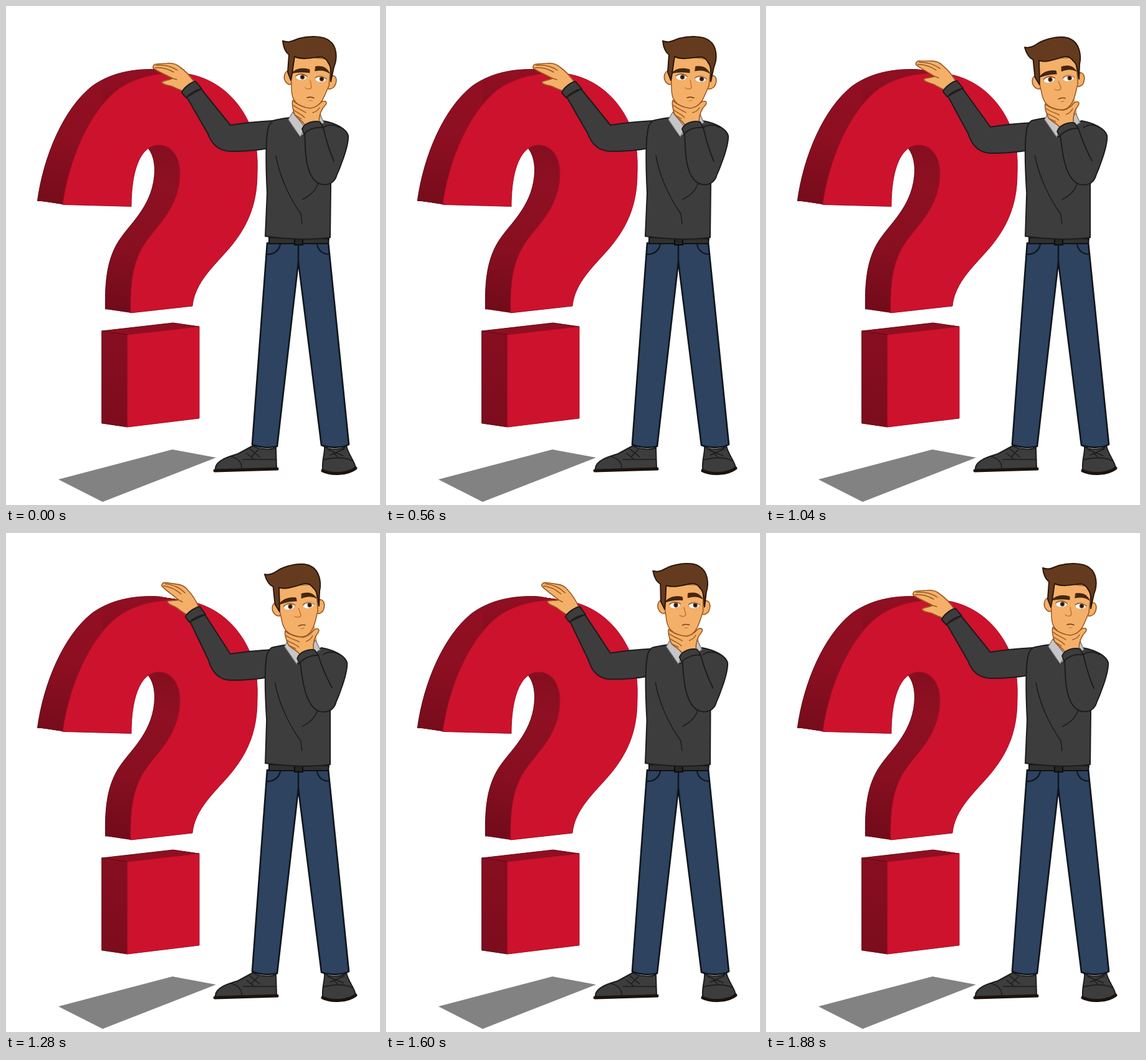
An HTML page with a canvas that plays this animation: 600x800 px, repeating every 1.92 s.

```html
<!DOCTYPE html>
<html lang="en">
<head>
<meta charset="utf-8">
<title>Thinking man</title>
<style>
html, body { margin: 0; width: 100%; height: 100%; overflow: hidden; background: #fff; }
canvas { display: block; width: 600px; height: 800px; }
</style>
</head>
<body>
<canvas id="stage" width="600" height="800"></canvas>
<script>
const ctx = document.getElementById('stage').getContext('2d');
const LOOP = 1920, STEP = 40;
const RED = '#cd122d', KNIT = '#3d3d3d', INK = '#1c1c1c', SKIN = '#f4b069', SKIN_LINE = '#97571f';
const HAIR = '#653b1f', HAIR_LINE = '#2b170a', DENIM = '#2d435f';
const HOOK = 'M91,318C101,246 133,171 178,135C211,111 251,106 286,108C338,115 375,150 393,195C402,218 404,240 403,268C403,317 388,352 361,385C335,416 303,442 299,481L200,492C199,445 203,407 226,376C243,352 278,322 279,270C279,240 265,223 245,223C215,223 201,265 201,321Z';

function shape(d, fill, line, width = 2) {
  const p = new Path2D(d);
  if (fill) { ctx.fillStyle = fill; ctx.fill(p); }
  if (line) { ctx.strokeStyle = line; ctx.lineWidth = width; ctx.stroke(p); }
}
const stroke = (d, line, width) => shape(d, null, line, width);

function dot(x, y, rx, ry, fill) {
  ctx.beginPath();
  ctx.ellipse(x, y, rx, ry, 0, 0, Math.PI * 2);
  ctx.fillStyle = fill;
  ctx.fill();
}

function turned(x, y, degrees, draw) {
  ctx.save();
  ctx.translate(x, y);
  ctx.rotate(degrees * Math.PI / 180);
  ctx.translate(-x, -y);
  draw();
  ctx.restore();
}

function fade(y0, y1, ...colors) {
  const g = ctx.createLinearGradient(0, y0, 0, y1);
  colors.forEach((c, i) => g.addColorStop(i / (colors.length - 1), c));
  return g;
}

// Smooth interpolation through [time, value] keys
function track(keys, t) {
  for (let i = 1; i < keys.length; i++) {
    const [t0, a] = keys[i - 1], [t1, b] = keys[i];
    if (t < t1) {
      const x = Math.max(0, (t - t0) / (t1 - t0));
      return a + (b - a) * x * x * (3 - 2 * x);
    }
  }
  return keys[keys.length - 1][1];
}

const LIFT = [[40, 0], [300, .65], [560, 0], [600, 0], [780, 1], [1140, 0],
  [1160, 0], [1335, .7], [1545, .7], [1720, 0]];
const GLANCE = [[40, 0], [200, -2.5], [400, -2.5], [560, 0]];

function leanAt(t) {
  const clamp = x => Math.min(1, Math.max(0, x));
  const go = 1 - (1 - clamp((t - 600) / 250)) ** 2;
  const back = 1 - (1 - clamp((t - 1520) / 360)) ** 2.5;
  return go - back;
}

// Sweeps the hook back in depth within one vertical strip
function extrude(x, width, fill) {
  const depth = 40.5;
  ctx.save();
  ctx.beginPath();
  ctx.rect(x, 0, width, 800);
  ctx.clip();
  for (let i = depth; i > 0; i--) {
    ctx.save();
    ctx.translate(-i, -i * 6 / depth);
    shape(HOOK, fill, i === depth ? '#5e0915' : null, 1);
    ctx.restore();
  }
  ctx.restore();
}

function question() {
  shape('M84,759L267,711L337,724L155,795Z', '#828282');
  extrude(0, 155, fade(100, 320, '#930f22', '#8d0f21', '#760c1b'));
  extrude(155, 445, fade(100, 490, '#930f22', '#800d1e', '#8f1022', '#870f20', '#720b1a'));
  shape(HOOK, RED, '#a40e24', 1);
  shape('M154,521L268,508L310,514L195,527Z', '#8f0f21', '#5e0915', 1);
  shape('M154,521L195,527L195,675L154,669Z', fade(521, 675, '#870e20', '#7c0d1d'), '#5e0915', 1);
  shape('M195,527L310,514L310,661L195,675Z', RED, '#a40e24', 1);
}

function legs() {
  shape('M336,741C337,729 355,723 372,718L396,705C405,711 425,712 433,708L434,741L336,746Z', KNIT, INK);
  stroke('M335,745L435,742', '#1d120c', 5);
  stroke('M360,722C373,725 379,733 378,742M380,727H433M391,710L407,723M405,711L394,722M386,717L398,727', INK, 1.6);
  shape('M508,741C507,728 512,715 511,707C520,712 540,712 546,705C549,720 560,730 561,741C550,751 520,752 507,745Z', KNIT, INK);
  stroke('M508,745C522,752 548,751 561,741', '#1d120c', 5);
  stroke('M509,728C525,723 545,723 555,729M516,711L541,721M543,710L520,720M526,717L533,724', INK, 1.6);

  shape('M419,380L395,703C405,708 423,709 435,706L469,410L506,704C518,709 540,709 550,703L517,379Z', DENIM, '#10151c', 2.6);
  stroke('M469,382V412', '#10151c', 2.4);
  stroke('M440,382C438,393 428,399 418,398M499,383C502,393 508,398 519,398', '#10151c', 2.2);
  shape('M422,371L518,373L517,381L422,381Z', '#303030', '#111', 2);
  shape('M463,373H476V383H463Z', '#252525', '#0c0c0c', 2);
}

function restingArm(lean, lift) {
  const drop = 3 * lean, ex = 345, ey = 214;
  const a = 8 * lift * Math.PI / 180, c = Math.cos(a), s = Math.sin(a);
  const bend = (x, y) => {
    const dx = x - ex, dy = y - ey;
    return (ex + dx * c - dy * s) + ',' + (ey + dx * s + dy * c);
  };
  const low = (x, y) => x + ',' + (y + drop);
  shape(`M${bend(290, 146)}L${bend(324, 205)}Q${low(334, 233)} ${low(362, 233)}Q${low(395, 233)} ${low(422, 228)}L${low(428, 184)}Q${low(390, 186)} ${low(360, 191)}L${bend(313, 133)}Z`, KNIT, INK);
  turned(ex, ey, 8 * lift, () => {
    turned(294, 129, 14 * lift, () => {
      shape('M303,123C296,113 288,104 279,98C273,92 266,91 258,92L242,93C236,93 234,99 238,101C246,106 256,110 267,116C262,119 253,119 250,122C252,128 264,126 271,131C277,134 281,135 286,137Z', SKIN, SKIN_LINE, 1.6);
      stroke('M239,99C250,98 260,101 269,106M241,95C254,94 266,97 275,103M267,116L274,118', SKIN_LINE, 1.5);
    });
    shape('M282,139C284,132 298,121 304,121L314,133C305,134 295,140 289,147Z', KNIT, INK);
  });
}

function torso(lean) {
  const k = 2 * lean / 170;
  ctx.save();
  ctx.transform(1, 0, k, 1, -k * 366, 0);
  shape('M428,184C438,181 448,180 455,179L471,210L508,184C530,188 546,197 549,208C550,225 535,262 528,277L521,284L520,371C490,376 440,373 416,369L419,300C417,260 416,220 420,199C421,192 424,187 428,184Z', KNIT, INK);
  ctx.save();
  ctx.translate(-4 * lean, 0);
  shape('M462,150L502,150L506,178L474,208L460,178Z', SKIN);
  shape('M460,170L453,182L472,210L480,195Z', '#c6c6c8', '#757575', 1.3);
  shape('M503,172L510,187L488,200L486,190Z', '#c6c6c8', '#757575', 1.3);
  ctx.restore();
  stroke('M433,240C440,280 460,315 473,333L475,349M476,310C490,303 498,294 501,283', INK, 1.5);
  ctx.restore();
}

function head(glance) {
  shape('M456,104C446,102 443,117 451,124C455,127 459,126 460,121Z', SKIN, SKIN_LINE, 1.6);
  shape('M521,112C530,109 533,120 526,130C521,134 517,134 515,131Z', SKIN, SKIN_LINE, 1.6);
  shape('M456,78L458,130C458,145 461,152 469,158C477,163 483,166 490,165C499,164 507,154 511,144L518,128L522,86Z', SKIN, SKIN_LINE, 1.5);

  for (const [x, y] of [[474, 113.5], [505, 116.5]]) {
    dot(x, y, 9.8, 6, '#e39a55');
    dot(x, y + .5, 8.8, 4.8, '#fff');
    dot(x + 1.5 + glance, y + .5, 3.6, 3.8, '#5a331d');
    dot(x + 1.5 + glance, y + .5, 1.8, 2, '#1c100a');
  }
  stroke('M465,112Q474,106 483,113M496,115Q505,110 514,117', '#7a451f', 1.2);
  shape('M458,108C464,101 475,98 487,102L487,107C476,105 466,106 458,108Z', '#472710', HAIR_LINE, .8);
  shape('M497,97C507,96 515,98 519,108C512,103 505,102 496,104Z', '#472710', HAIR_LINE, .8);
  stroke('M488,119L490,130C489,134 484,134 480,131', '#bd773a', 1.5);
  stroke('M483,147Q488,145 494,147.5', '#7c401a', 1.6);
  stroke('M486,152H491', '#bd773a', 1.1);

  shape('M444,56C455,60 461,55 470,52C486,48 509,47 519,56C531,64 532,84 526,98L521,121C521,111 523,98 517,91C513,83 508,81 500,82C486,84 473,86 463,81C461,92 460,105 457,119L452,106L454,78C448,74 445,66 444,56Z', HAIR, HAIR_LINE, 2);
}

function foldedArm() {
  shape('M460,151C466,158 478,163 488,164C497,163 502,158 506,154C511,151 516,153 513,158C507,164 502,173 502,187L479,190C476,184 467,180 463,174C460,165 458,157 460,151Z', SKIN, SKIN_LINE, 1.6);
  stroke('M461,159C468,165 475,167 481,171M462,167C469,172 475,174 479,179M464,175L474,181M503,163C500,168 496,170 492,171', SKIN_LINE, 1.4);
  shape('M479,200L480,225C481,252 486,278 503,285C516,289 526,284 530,273L524,246C517,230 513,212 509,194Z', KNIT);
  stroke('M479,200L480,225C481,252 486,278 503,285C516,289 526,284 530,273M509,195C513,213 518,230 526,249', INK, 1.9);
  shape('M475,197C479,187 494,183 504,186L509,195C498,194 486,197 478,205Z', KNIT, INK, 1.9);
}

function draw(t) {
  const lean = leanAt(t), lift = track(LIFT, t);
  ctx.fillStyle = '#fff';
  ctx.fillRect(0, 0, 600, 800);
  ctx.lineJoin = ctx.lineCap = 'round';
  question();
  legs();
  restingArm(lean, lift);
  torso(lean);
  turned(488, 227, -10 * lean, () => head(track(GLANCE, t)));
  turned(515, 280, -5.5 * lean, foldedArm);
  stroke('M509,195C517,189 527,190 535,195', INK, 1.6);
}

const start = performance.now();
function tick() {
  const t = (performance.now() - start) % LOOP;
  draw(Math.floor(t / STEP) * STEP);
  requestAnimationFrame(tick);
}
tick();
</script>
</body>
</html>
```
